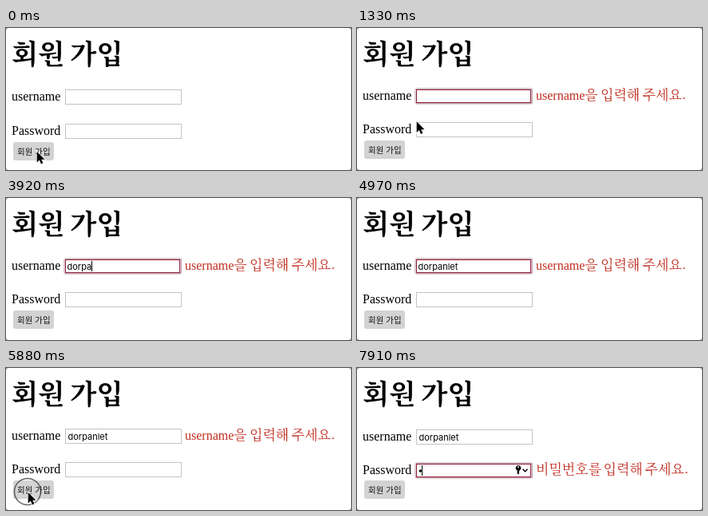
Animation, 432 px wide and 178 px high, one loop 8 s. Source, as an HTML page:

```html
<!DOCTYPE html>
<html lang="ko">
<head>
<meta charset="utf-8">
<title>회원 가입</title>
<style>
  html, body { margin: 0; width: 100%; height: 100%; overflow: hidden; background: #8c8c8c; }
  svg { display: block; width: 432px; height: 178px; }
  .label { font: 16px "Liberation Serif", serif; }
  .title { font: 700 34.5px "Noto Serif CJK KR", "Noto Sans CJK KR", "Noto Sans CJK", sans-serif; }
  .ko { font: 17px "Noto Serif CJK KR", "Noto Sans CJK KR", "Noto Sans CJK", sans-serif; }
  .btn { font: 10.5px "Noto Sans CJK KR", "Noto Sans CJK", sans-serif; fill: #111; }
  .value { font: 11px Inter, "Liberation Sans", sans-serif; }
  .error { fill: #c02c1e; }
  .frame { fill: #fff; stroke: #c3c3c3; }
  .focus rect { fill: none; }
</style>
</head>
<body>
<svg viewBox="0 0 432 178">
  <defs>
    <g id="focus" class="focus">
      <rect x="74" y="1" width="144" height="17" rx="2" stroke="#b58a9c" stroke-opacity=".22" stroke-width="5"/>
      <rect x="74" y="1" width="144" height="17" rx="1" stroke="#b58a9c" stroke-opacity=".35" stroke-width="3"/>
      <rect x="74.5" y="1.5" width="143" height="16" style="fill:#fff" stroke="#962038"/>
    </g>
  </defs>
  <rect width="432" height="178" rx="3.5" fill="#fff"/>
  <g class="title"><text x="7" y="44.5">회원</text><text x="80" y="44.5">가입</text></g>

  <g id="row1">
    <text class="label" x="7" y="14">username</text>
    <rect class="frame" x="74.5" y=".5" width="145" height="18"/>
    <use id="focus1" href="#focus"/>
    <text id="value" class="value" y="13.5"></text>
    <g id="error1" class="error">
      <text class="label" x="224" y="14">username</text>
      <g class="ko"><text x="285" y="14">을</text><text x="305" y="14">입력해</text><text x="357.5" y="14">주세요.</text></g>
    </g>
  </g>

  <g id="row2">
    <text class="label" x="7" y="14">Password</text>
    <rect class="frame" x="74.5" y=".5" width="145" height="18"/>
    <use id="focus2" href="#focus"/>
    <circle id="dot" cx="79.3" cy="10" r="1.7"/>
    <g id="error2">
      <path d="M202 3a3.3 3.3 0 0 1 1.4 6.3v1.2l-1 .9 1 1-1.4 2-1.4-1.5V9.3A3.3 3.3 0 0 1 202 3zm0 1.3a.9.9 0 1 0 .01 0z"/>
      <path d="M207.5 7.7l3 3 3-3" fill="none" stroke="#000" stroke-width="1.5"/>
      <g class="ko error"><text x="224" y="14">비밀번호를</text><text x="308.5" y="14">입력해</text><text x="360.5" y="14">주세요.</text></g>
    </g>
  </g>

  <g id="button">
    <rect x="9" width="51" height="23" rx="3" fill="#d3d3d3"/>
    <text class="btn" x="14" y="15.7">회원 가입</text>
  </g>

  <rect id="caret" width="1" height="13"/>
  <g id="pointer">
    <circle id="ring" r="16.5" fill="none" stroke="#333" stroke-opacity=".75" stroke-width="1.5"/>
    <path id="arrow" d="M.7 .8V14.6L3.9 11.6 6 16.4 8.4 15.3 6.3 10.7H10.5Z" stroke="#fff" stroke-width="1.6" paint-order="stroke"/>
    <g id="beam" fill="none" stroke-linecap="round">
      <path d="M-3 -6.5Q0 -6.5 0 -4.5Q0 -6.5 3 -6.5M0 -4.5V5.5M-3 7.5Q0 7.5 0 5.5Q0 7.5 3 7.5M-2 3.5H2" stroke="#fff" stroke-width="2.8"/>
      <path d="M-3 -6.5Q0 -6.5 0 -4.5Q0 -6.5 3 -6.5M0 -4.5V5.5M-3 7.5Q0 7.5 0 5.5Q0 7.5 3 7.5M-2 3.5H2" stroke="#111" stroke-width="1.2"/>
    </g>
  </g>
</svg>
<script>
  const LOOP = 8000, STEP = 70;
  const NAME = "dorpanlet";
  const KEYS = [3290, 3360, 3500, 3640, 3920, 4130, 4200, 4340, 4410];
  const CARET = [[420, 910], [1400, 1960], [2520, 3080], [3290, 4970], [5460, 5880], [6090, 6580], [7140, 7630], [7910, LOOP]];
  const CLICKS = [[280, 420], [1750, 1890], [5880, 6020]];
  const HIDDEN = [[3290, 5110], [7910, LOOP]];
  // time, x, y of the pointer's hot spot
  const PATH = [
    [0, 38, 154], [70, 37.5, 156], [140, 36.5, 158.5], [980, 36.5, 158.5],
    [1120, 43, 151], [1260, 62, 129], [1400, 86, 104], [1540, 99, 92], [1610, 102, 90],
    [5040, 102, 90], [5110, 98, 89], [5180, 97, 89], [5250, 97, 89],
    [5320, 91, 103], [5390, 80, 126], [5460, 71, 144.5], [5600, 45, 154], [5740, 27, 155], [LOOP, 27, 155]
  ];

  const el = {};
  document.querySelectorAll("[id]").forEach(e => el[e.id] = e);
  const show = (e, on) => e.setAttribute("visibility", on ? "visible" : "hidden");
  const place = (e, x, y) => e.setAttribute("transform", `translate(${x} ${y})`);
  const within = (t, spans) => spans.some(([a, b]) => t >= a && t < b);

  function pointerAt(t) {
    const i = PATH.findIndex(p => p[0] > t);
    const [a, ax, ay] = PATH[i - 1], [b, bx, by] = PATH[i];
    const k = (t - a) / (b - a);
    return [ax + (bx - ax) * k, ay + (by - ay) * k];
  }

  function draw(time) {
    const t = Math.floor(time / STEP) * STEP;
    const error = t < 420 ? 0 : t < 6020 ? 1 : 2;
    const focus = t < 420 ? 0 : t < 5880 ? 1 : t < 6020 ? 0 : 2;
    const y1 = error === 1 ? 76 : 77;
    const y2 = 120 - [0, 2, 1][error];

    place(el.row1, 0, y1);
    place(el.row2, 0, y2);
    place(el.button, 0, error ? 141 : 143);
    show(el.focus1, focus === 1);
    show(el.focus2, focus === 2);
    show(el.error1, error === 1);
    show(el.error2, error === 2);

    const typed = NAME.slice(0, KEYS.filter(k => k <= t).length);
    el.value.textContent = typed;
    el.value.setAttribute("x", focus === 1 ? 76.5 : 77.5);
    const masked = t >= 7910;
    show(el.dot, masked);

    const width = focus === 1 ? (typed ? el.value.getComputedTextLength() : 0) : masked ? 5 : 0;
    place(el.caret, 76 + Math.round(width), (focus === 2 ? y2 : y1) + 3);
    show(el.caret, within(t, CARET));

    const [x, y] = pointerAt(t);
    const visible = !within(t, HIDDEN);
    const overField = x > 74 && y < 96;
    place(el.pointer, x, y);
    show(el.arrow, visible && !overField);
    show(el.beam, visible && overField);
    show(el.ring, within(t, CLICKS));
  }

  const start = performance.now();
  function tick() {
    draw((performance.now() - start) % LOOP);
    requestAnimationFrame(tick);
  }
  tick();
</script>
</body>
</html>
```
